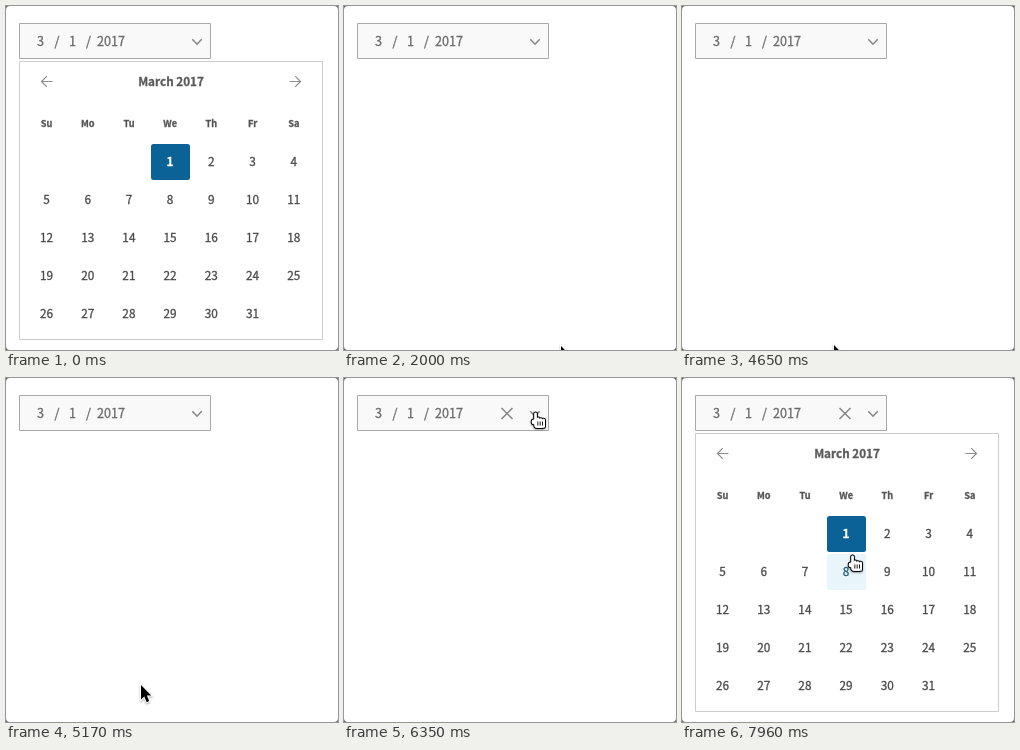
Recreate the animation shown at these times as an HTML page with a canvas. Size 332x344 px, loop 8000 ms.

```html
<!DOCTYPE html>
<html lang="en">
<head>
<meta charset="utf-8">
<title>Date picker</title>
<style>
  html, body { margin: 0; width: 100%; height: 100%; overflow: hidden; background: #fff; }
  canvas { display: block; }
</style>
</head>
<body>
<canvas id="stage" width="332" height="344"></canvas>
<script>
const WIDTH = 332, HEIGHT = 344, LOOP = 8000;
const COLUMN = 41.2, ROW = 38;
const CLOSE_AT = 1780, OPEN_AT = 6910;
const FONT = '"Noto Sans CJK JP", "Noto Sans CJK SC", "Noto Sans CJK", "Open Sans", sans-serif';
const ctx = document.getElementById('stage').getContext('2d');

// The pointer waits below the stage, then glides: start, end, x, y.
const START = { x: 172, y: 360 };
const GLIDES = [
  [90, 170, 171, 150], [170, 250, 172, 360], [400, 500, 240, 346],
  [1090, 1390, 170, 141], [1780, 2000, 217, 340], [2390, 3430, 157, 346],
  [4570, 4950, 114, 287], [4950, 5170, 135, 307], [5480, 5700, 192, 86],
  [5960, 6350, 192, 34], [7200, 7500, 192, 54.5], [7560, 7860, 171, 177],
];

const ARROW = new Path2D('M0 0V14.6L3.3 11.5 5.6 17.2 8.2 16.1 5.9 10.5H10.3Z');
const CHEVRON = new Path2D('M186.3 33.3L191 38.2 195.7 33.3');
const CROSS = new Path2D('M157.5 30L168.5 41M168.5 30L157.5 41');
const BACK = new Path2D('M46.5 75.5H35.8M40.8 70.2L35.5 75.5 40.8 80.8');

const HAND = new Path2D();
HAND.roundRect(3.2, 8, 10.8, 8, 3);
HAND.roundRect(.7, 7.6, 4, 4.6, 2);
for (let i = 0; i < 4; i++) HAND.roundRect(3.2 + 2.7 * i, i ? 5 + .6 * i : .6, 2.7, 9, 1.3);

const clamp = v => Math.max(0, Math.min(1, v));
const smooth = v => v * v * (3 - 2 * v);

function pointerAt(t) {
  let { x, y } = START;
  for (const [from, to, tx, ty] of GLIDES) {
    const p = smooth(clamp((t - from) / (to - from)));
    x += (tx - x) * p;
    y += (ty - y) * p;
  }
  return { x, y };
}

const openness = t => clamp(1 - (t - CLOSE_AT) / 180) + clamp((t - OPEN_AT) / 250);

function cellOf(day) {
  const slot = day + 2;
  return { x: 145 + (slot % 7 - 3) * COLUMN, y: 138 + Math.floor(slot / 7) * ROW };
}

// Share of the last 120 ms that the pointer spent over a cell.
function hoverAmount(cell, t) {
  let hits = 0;
  for (let k = 0; k < 8; k++) {
    const p = pointerAt(t - k * 15);
    if (p.x >= cell.x && p.x < cell.x + 39 && p.y >= cell.y && p.y < cell.y + 36) hits++;
  }
  return hits / 8;
}

// A hairline outline gives the type its slightly heavier look.
function text(str, x, y, size, color, weight = 400, align = 'center') {
  ctx.font = `${weight} ${size}px ${FONT}`;
  ctx.textAlign = align;
  ctx.fillStyle = ctx.strokeStyle = color;
  ctx.lineWidth = .3;
  ctx.fillText(str, x, y);
  ctx.strokeText(str, x, y);
}

function line(path, color, width) {
  ctx.strokeStyle = color;
  ctx.lineWidth = width;
  ctx.stroke(path);
}

function box(x, y, w, h, radius, fill, border) {
  const path = new Path2D();
  path.roundRect(x, y, w, h, radius);
  ctx.fillStyle = fill;
  ctx.fill(path);
  if (border) line(path, border, 1);
}

function drawInput(active) {
  box(13.5, 17.5, 191, 35, 0, '#f9f9f9', '#a8a8a8');
  [['3', 31], ['/', 48.5], ['1', 63], ['/', 80], ['2017', 91]]
    .forEach(([str, x]) => text(str, x, 40, 12.6, '#6a6a6a', 400, 'left'));
  line(CHEVRON, '#888', 1.6);
  if (active) line(CROSS, '#888', 1.6);
}

function drawDay(day, t) {
  const { x, y } = cellOf(day), selected = day === 1;
  const hover = selected ? 0 : hoverAmount({ x, y }, t);
  if (selected) box(x, y, 39, 36, 2.5, '#0a6297');
  if (hover) box(x, y, 39, 36, 2, `rgba(232,245,250,${hover})`);
  const color = selected ? '#fff' : hover > .5 ? '#1f5c7d' : '#4a4a4a';
  text(day, x + 19.1, y + 22, 11.8, color, selected ? 700 : 400);
}

function drawCalendar(t) {
  const p = 1 - (1 - openness(t)) ** 3;
  if (!p) return;
  ctx.save();
  ctx.globalAlpha = p;
  if (t > OPEN_AT) ctx.translate(0, -52 * (1 - p));
  box(13.5, 55.5, 303, 278, 0, '#fff', '#ccc');
  line(BACK, '#8c8c8c', 1.2);
  ctx.save();
  ctx.translate(330, 0);
  ctx.scale(-1, 1);
  line(BACK, '#8c8c8c', 1.2);
  ctx.restore();
  text('March 2017', 165, 80, 11.7, '#5a5a5a', 700);
  ['Su', 'Mo', 'Tu', 'We', 'Th', 'Fr', 'Sa']
    .forEach((name, i) => text(name, 40.6 + i * COLUMN, 121, 9.2, '#555', 700));
  for (let day = 1; day <= 31; day++) drawDay(day, t);
  ctx.restore();
}

function drawPointer({ x, y }, isHand) {
  const shape = isHand ? HAND : ARROW;
  ctx.save();
  ctx.translate(x - (isHand ? 5 : 0), y);
  ctx.shadowColor = 'rgba(0,0,0,.35)';
  ctx.shadowBlur = 2;
  ctx.shadowOffsetY = 1;
  line(shape, isHand ? '#000' : '#fff', 2);
  ctx.shadowColor = 'transparent';
  ctx.fillStyle = isHand ? '#fff' : '#000';
  ctx.fill(shape);
  if (isHand) {
    ctx.fillStyle = '#000';
    for (let i = 0; i < 3; i++) ctx.fillRect(6.4 + 2.3 * i, 9.5, .9, 4);
  }
  ctx.restore();
}

function draw(t) {
  const pointer = pointerAt(t);
  const overInput = pointer.y < 53;
  const overCalendar = openness(t) > 0 && pointer.y < 334;
  ctx.fillStyle = '#666';
  ctx.fillRect(0, 0, WIDTH, HEIGHT);
  box(0, 0, WIDTH, HEIGHT, 4, '#fff');
  drawInput(overInput || t > OPEN_AT);
  drawCalendar(t);
  drawPointer(pointer, overInput || overCalendar);
}

function tick() {
  draw(performance.now() % LOOP);
  requestAnimationFrame(tick);
}
tick();
</script>
</body>
</html>
```
